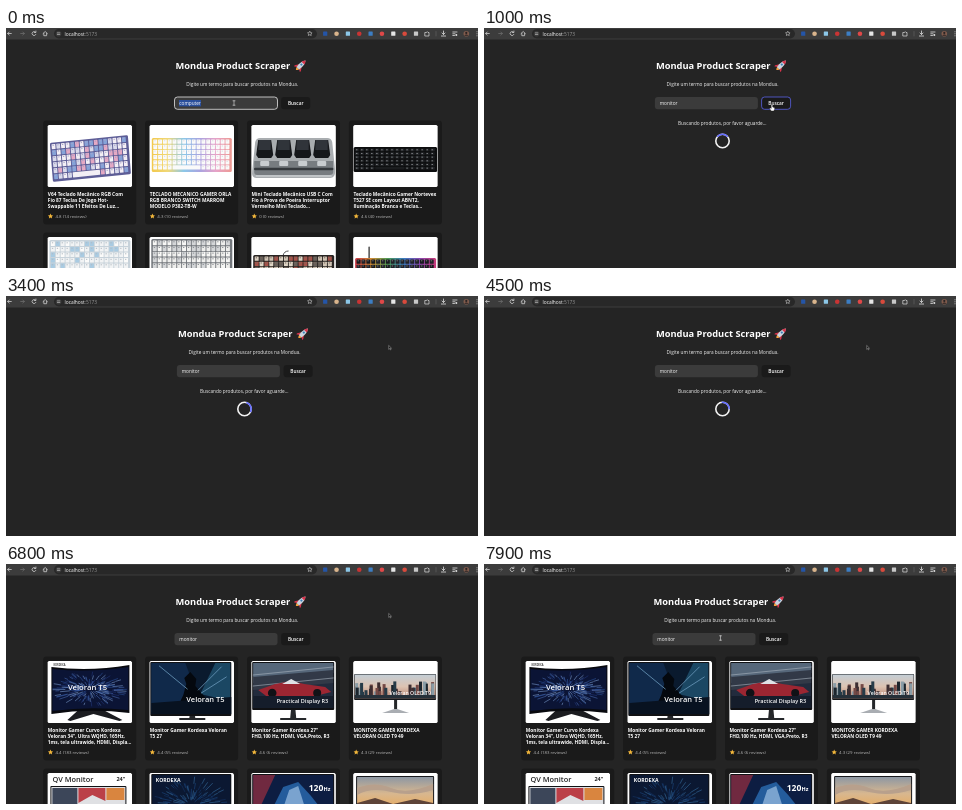
An HTML page that plays this animation: 472x240 px, repeating every 8000 ms.

```html
<!DOCTYPE html>
<html lang="pt-BR">
<head>
<meta charset="utf-8">
<title>Product Scraper</title>
<style>
  html, body { margin: 0; width: 100%; height: 100%; overflow: hidden; background: #242424; }
  svg { display: block; width: 472px; height: 240px; font-family: "Open Sans", "Noto Sans", sans-serif; }
</style>
</head>
<body>
<svg id="stage" viewBox="0 0 472 240" xmlns="http://www.w3.org/2000/svg"></svg>
<script>
const LOOP = 8000, STEP = 100, SEARCH_AT = 1000, RESULTS_AT = 6700;

const rect = (x, y, w, h, fill, r = 0, more = '') =>
  `<rect x="${x}" y="${y}" width="${w}" height="${h}" rx="${r}" fill="${fill}" ${more}/>`;
const circle = (x, y, r, fill) => `<circle cx="${x}" cy="${y}" r="${r}" fill="${fill}"/>`;
const path = (d, fill) => `<path d="${d}" fill="${fill}"/>`;
const line = (d, color = '#ccc', width = .8) =>
  `<path d="${d}" fill="none" stroke="${color}" stroke-width="${width}" stroke-linecap="round"/>`;
const text = (x, y, size, str, fill = '#fff', weight = 400, more = '') =>
  `<text x="${x}" y="${y}" font-size="${size}" fill="${fill}" font-weight="${weight}" ${more}>${str}</text>`;
const group = (transform, body, more = '') => `<g transform="${transform}" ${more}>${body}</g>`;
const gradient = (id, colors, down = 0) =>
  `<linearGradient id="${id}" x2="${1 - down}" y2="${down}">` +
  colors.map((c, i) => `<stop offset="${i / (colors.length - 1)}" stop-color="${c}"/>`).join('') + '</linearGradient>';

function randomFrom(seed) {
  return () => (seed = (seed * 16807) % 2147483647) / 2147483647;
}

function starPath(cx, cy, r) {
  return 'M' + Array.from({ length: 10 }, (_, i) => {
    const a = i * Math.PI / 5 - Math.PI / 2, d = i % 2 ? r * .48 : r;
    return `${(cx + d * Math.cos(a)).toFixed(2)} ${(cy + d * Math.sin(a)).toFixed(2)}`;
  }).join('L') + 'Z';
}

function toolbar() {
  const badges = ['#2455a8', '#d9b48c', '#8cc7e8', '#c93434', '#3c7ec4', '#e04848', '#e6e6e6', '#d84a3c', '#c8c8c8'];
  return rect(0, 0, 472, 11.5, '#3c3c3c') + rect(48, 1, 263, 9.5, '#282828', 4.7) +
    line('M5.3 5.5H1.7M3.2 4L1.7 5.5L3.2 7') +
    line('M14.7 5.5H18.3M16.8 4L18.3 5.5L16.8 7', '#6c6c6c') +
    line('M29.6 4.2A2 2 0 1 0 29.9 6.4M29.9 3V4.5H28.4') +
    line('M37 5.6L39.2 3.5L41.4 5.6M37.8 5.2V7.7H40.6V5.2') +
    circle(52.6, 5.7, 2.8, '#3c3c3c') + line('M51.4 4.9H53.8M51.4 6.5H53.8', '#ccc', .6) +
    text(58.6, 7.5, 4.8, 'localhost<tspan fill="#999">:5173</tspan>') +
    `<path d="${starPath(303.8, 5.6, 2.4)}" fill="none" stroke="#ccc" stroke-width=".6"/>` +
    badges.map((c, i) => {
      const x = 319.2 + i * 11.35;
      return i % 2 ? circle(x, 5.7, 2.3, c) : rect(x - 2.1, 3.6, 4.2, 4.2, c, .5);
    }).join('') +
    line('M419.2 4.5H420.5Q421.3 2.8 422 4.5H423V8H419.2Z', '#ddd', .7) + line('M430 3.5V8', '#666', .6) +
    line('M437.5 3V6.4M436 5L437.5 6.5L439 5M435.4 8H439.6', '#ddd') +
    line('M446.8 4H451M446.8 5.8H449M446.8 7.5H448.5', '#ddd') + circle(450.3, 7, 1, '#ddd') +
    circle(460.3, 5.7, 2.8, '#805b4c') + path('M458.2 7.8Q460.3 5 462.4 7.8Z', '#292323') + circle(460.3, 4.9, 1.1, '#292323') +
    [3.7, 5.7, 7.7].map(y => circle(471, y, .5, '#ddd')).join('');
}

const rocket = group('translate(294.6 37.4) rotate(45) scale(.88)',
  path('M-2 4Q0 10.5 2 4Z', '#f9a23b') + path('M-2.2 .5L-4.8 4.5V6L-1.5 4ZM2.2 .5L4.8 4.5V6L1.5 4Z', '#d8344c') +
  path('M0 -8Q3.6 -3.5 2 4.4H-2Q-3.6 -3.5 0 -8Z', '#ccd5df') + path('M0 -8Q1.9 -5.8 2.3 -3.7H-2.3Q-1.9 -5.8 0 -8Z', '#d8344c') +
  circle(0, -1.3, 1.25, '#3c81b8'));

const header =
  text(169.5, 41.2, 9.3, 'Mondua Product Scraper', '#fff', 700) + rocket +
  text(180.2, 57.5, 4.72, 'Digite um termo para buscar produtos na Mondua.', '#f4f4f4') +
  rect(168.5, 69, 103, 12.3, '#3b3b3b', 3, 'id="field" stroke-width=".8"') +
  rect(173, 72, 22, 6.4, '#2a4f9c', 0, 'id="selection"') +
  text(173.3, 76.9, 4.72, '', '#fff', 500, 'id="query"') +
  rect(275.2, 69, 29, 12.3, '#1a1a1a', 3, 'id="button" stroke-width=".7"') +
  text(281.9, 76.9, 4.75, 'Buscar', '#fff', 600);

const loading =
  text(194, 97.2, 4.72, 'Buscando produtos, por favor aguarde...', '#f4f4f4') +
  '<circle cx="238.5" cy="113" r="6.7" fill="none" stroke="#f3f3f3" stroke-width="1.6"/>' +
  `<g id="spinner">${line('M233.76 108.26A6.7 6.7 0 0 1 243.24 108.26', '#646cff', 1.6)}</g>`;

// Product art is drawn in a box of 84.7 by 62.
function keyboard(x, y, w, h, body, colors, legend = 'none') {
  const random = randomFrom(7), cols = 16, rows = 6;
  const dx = (w - 3) / cols, dy = (h - 3) / rows;
  let art = rect(x, y, w, h, body, 1.5);
  for (let r = 0; r < rows; r++) {
    for (let c = 0; c < cols; c++) {
      const space = r === rows - 1 && c > 3 && c < 10;
      if (space && c > 4) continue;
      const color = colors[Math.floor(random() * colors.length)];
      const left = x + 1.5 + c * dx, top = y + 1.5 + r * dy;
      art += rect(left.toFixed(2), top.toFixed(2),
        ((space ? 6 : 1) * dx - .9).toFixed(2), (dy - .9).toFixed(2), color, .5);
      if (!space) art += rect((left + 1).toFixed(2), (top + .8).toFixed(2), 1.3, 1, legend);
    }
  }
  return art;
}

function switchPad() {
  let art = path('M4 17Q5 13 9 13H76Q80 13 81 17L84 46Q84 53 79 53H5Q0 53 1 46Z', '#a9adb0') +
    path('M3 36H82V47Q82 50 78 50H6Q3 50 3 47Z', '#777c80') + line('M4 44H81', '#35393d', 2.4) + line('M5 51H80', '#d8dcde', 1);
  for (let i = 0; i < 4; i++) {
    const x = 5 + i * 19;
    art += path(`M${x} 30L${x + 2} 15H${x + 15}L${x + 17} 30L${x + 15} 33H${x + 2}Z`, '#15171a') +
      path(`M${x + 2.5} 15H${x + 14.5}L${x + 14.5} 25H${x + 2}Z`, '#30343a') + rect(x + 4, 36, 9, 5, '#c9cdd0', 1);
  }
  return art;
}

const stand = (cx, y) => path(`M${cx - 2} ${y}H${cx + 2}L${cx + 3} 57H${cx + 13}V59H${cx - 13}V57H${cx - 3}Z`, '#25272a');
const screen = (x, y, w, h, fill) => rect(x, y, w, h, '#101114', 1) + rect(x + 1, y + 1, w - 2, h - 3, fill);
const label = (x, y, size, str, fill = '#fff', weight = 600) => text(x, y, size, str, fill, weight);

function burst(cx, cy, rx, ry, colors) {
  const random = randomFrom(73);
  let art = '';
  for (let i = 0; i < 150; i++) {
    const a = i * 2.4, inner = .15 + random() * .7, outer = inner + .08 + random() * .25;
    const point = d => `${(cx + Math.cos(a) * d * rx).toFixed(1)} ${(cy + Math.sin(a) * d * ry).toFixed(1)}`;
    art += line(`M${point(inner)}L${point(Math.min(1, outer))}`, colors[i % colors.length], .5);
  }
  return art;
}

const curvedMonitor = () =>
  path('M31 49L42 47L56 49L75 59L72 60L46 53L23 60L20 59Z', '#1b1c20') +
  path('M4 6Q42 11 82 4V52Q42 47 4 53Z', '#08090e') + path('M5 8Q42 12 81 6V49Q42 45 5 50Z', '#0b1435') +
  burst(42, 28, 37, 17, ['#315ba9', '#8fb2e6', '#243b83', '#5379c4']) +
  label(6, 5, 2.6, 'KORDEXA', '#222') + label(20.5, 29, 7.7, 'Veloran T5');

const heroMonitor = () =>
  stand(43, 50) + screen(1, 1, 81, 54, '#0a1a2e') +
  path('M2 2L36 2L48 34L25 51H2Z', '#10294a') + path('M66 2L81 2V40L51 33Z', '#1b4763') +
  path('M26 51L34 34L37 23L35 17L41 11L47 18L46 25L60 41L52 40L56 51Z', '#04080e') +
  line('M10 5L38 28M72 6L49 29M77 16L52 32', '#6b9abb', .8) + path('M2 42L82 36V53H2Z', '#081220') +
  label(37, 40.5, 7.5, 'Veloran T5');

const racingMonitor = () =>
  stand(42, 46) + screen(1, 1, 82, 48, '#222b3d') +
  path('M2 2H82V12L2 22Z', '#56677a') + path('M2 16L82 9V22L2 29Z', '#323947') + line('M2 14L82 6M2 25L82 17', '#aab4bf', .6) +
  path('M7 29L24 23L40 20L53 23L74 26L80 31L64 35H15Z', '#9c2632') + path('M31 23L40 18L49 23Z', '#dfe2e6') +
  circle(21, 32, 4.3, '#101116') + circle(66, 32, 4, '#101116') +
  rect(2, 35, 80, 12, '#151d2b') + label(25.5, 41.5, 5.5, 'Practical Display R3');

function wideMonitor() {
  const random = randomFrom(19);
  let art = rect(41, 38, 3, 12, '#25272a') + path('M41 48H44L56 52H29Z', '#a9adb2') + rect(1, 13, 82, 26, '#15171a', 1) +
    rect(1.5, 13.5, 81, 24, 'url(#dusk)');
  for (let i = 0; i < 44; i++) {
    const x = 2 + random() * 77, h = 5 + random() * 11;
    art += rect(x.toFixed(1), (36 - h).toFixed(1), 3, h.toFixed(1), ['#3c2d31', '#744945', '#263b48', '#8a9da7', '#1c252d'][i % 5]);
  }
  return art + rect(1.5, 34, 81, 3.5, '#26313a') + label(36.5, 34, 5.2, 'Veloran OLED T9');
}

const keyboards = [
  { name: ['V64 Teclado Mecânico RGB Com', 'Fio 87 Teclas De Jogo Hot-', 'Swappable 11 Efeitos De Luz...'],
    rating: '4.8 (14 reviews)',
    art: group('matrix(1 -.1 .08 1 0 0)',
      keyboard(1, 18, 78, 39, '#5d5d96', ['#f3eff5', '#f3eff5', '#e5a9c4', '#86a3d8', '#d9daeb'], '#a9a4c8')) },
  { name: ['TECLADO MECANICO GAMER ORLA', 'RGB BRANCO SWITCH MARROM', 'MODELO P382-TB-W'], rating: '4.3 (10 reviews)',
    art: keyboard(2.5, 13, 80, 34, 'url(#rainbow)', ['#fafafa'], '#dedee2') },
  { name: ['Mini Teclado Mecânico USB C Com', 'Fio à Prova de Poeira Interruptor', 'Vermelho Mini Teclado...'],
    rating: '0 (0 reviews)', art: switchPad() },
  { name: ['Teclado Mecânico Gamer Nortevex', 'T527 SE com Layout ABNT2,', 'Iluminação Branca e Teclas...'],
    rating: '4.6 (40 reviews)', art: keyboard(.5, 22, 83.5, 25, '#0c0d0e', ['#1b1d1f', '#222427'], '#8c8f92') },
  { art: keyboard(2, 3, 81, 36, '#c7d2da', ['#fbfbfa', '#f1f3f4', '#f1f3f4', '#a9cbe2'], '#b2bac2') },
  { art: keyboard(2, 2, 81, 37, '#73777c', ['#f7f7f5', '#eeeeec', '#d4d6d8'], '#8c9095') },
  { art: line('M32 18Q33 14 37 14', '#555', 1) +
    keyboard(2, 18, 81, 34, '#292523', ['#ded4c5', '#d2c6b6', '#ded4c5', '#a7534a', '#68605a'], '#77695e') },
  { art: line('M16 22V10', '#222', 1.2) + keyboard(2, 21, 81, 34, 'url(#neon)', ['#18191d', '#222329'], '#777') }
];

const monitors = [
  { name: ['Monitor Gamer Curvo Kordexa', 'Veloran 34", Ultra WQHD, 165Hz,', '1ms, tela ultrawide, HDMI, Displa...'],
    rating: '4.4 (183 reviews)', art: curvedMonitor() },
  { name: ['Monitor Gamer Kordexa Veloran', 'T5 27'], rating: '4.4 (55 reviews)', art: heroMonitor() },
  { name: ['Monitor Gamer Kordexa 27"', 'FHD,100 Hz, HDMI, VGA,Preto, R3'], rating: '4.6 (6 reviews)', art: racingMonitor() },
  { name: ['MONITOR GAMER KORDEXA', 'VELORAN OLED T9 49'], rating: '4.3 (29 reviews)', art: wideMonitor() },
  { art: label(5, 9, 7.4, 'QV Monitor', '#252525') + label(69, 8, 5.5, '24"', '#252525', 700) + screen(3, 13, 76, 44, '#dfe0e3') +
    rect(5, 15, 25, 28, '#3c4659') + path('M31 15H58V28L45 22L31 30Z', '#bb4048') +
    rect(59, 15, 18, 12, '#d9853f') + rect(31, 31, 26, 12, '#7c9fc0') },
  { art: screen(2, 1, 80, 56, '#0b1832') + burst(42, 32, 38, 28, ['#1d4f8d', '#16386c', '#3f7fb5']) +
    label(6.5, 9, 5.2, 'KORDEXA', '#fff', 700) },
  { art: screen(1, 1, 82, 56, '#0d1d42') + path('M2 2H24L10 32H2Z', '#702940') + path('M23 32L32 14L47 9L59 22L67 32Z', '#245c9c') +
    path('M33 32L38 17L47 13L53 32Z', '#7aa3cf') + label(57.5, 17.5, 8.6, '120<tspan font-size="5.5">Hz</tspan>', '#fff', 700) },
  { art: rect(3, 3, 78, 55, '#17181b', 1) + rect(4, 4, 76, 50, 'url(#sunset)') +
    path('M4 15Q22 8 38 15T80 11V17Q58 24 38 19T4 22Z', '#b8a08c') + path('M4 30L22 25L40 31L62 26L80 30V54H4Z', '#5d4338') }
];

function card({ name = [], rating, art }, i) {
  const x = 37.2 + (i % 4) * 101.9, y = i < 4 ? 92.5 : 204.5;
  const words = name.map((row, n) => text(4.6, 75 + n * 6, 4.8, row, '#fff', 700)).join('');
  const score = rating ? path(starPath(7.3, 95.8, 2.7), '#f3b73b') + text(12.2, 97.3, 4.35, rating, '#bbb') : '';
  return group(`translate(${x} ${y})`, rect(0, 0, 93, 104, '#1a1a1a', 3) +
    group('translate(4.2 4.5)', rect(0, 0, 84.7, 62, '#fff', 1.5) + art, 'clip-path="url(#photo)"') + words + score);
}

const pointers = {
  beam: line('M-1 -2.2H1M0 -2.2V2.2M-1 2.2H1', '#ddd', .6),
  hand: `<path d="M-.8 -2.5Q0 -3.3 .7 -2.5V0L2.7 .7V2.3L1.8 4H-.8L-2.5 1.4L-1.8 .8L-.8 1.5Z" fill="#fff" stroke="#111" stroke-width=".4"/>`,
  arrow: `<path d="M-.3 -1.6V2.4L.7 1.5L1.3 2.9L2 2.6L1.4 1.2H2.5Z" fill="#111" stroke="#ccc" stroke-width=".4"/>`
};

const stage = document.getElementById('stage');
stage.innerHTML =
  `<defs><clipPath id="photo">${rect(0, 0, 84.7, 62, '#fff', 1.5)}</clipPath>` +
  gradient('rainbow', ['#f2c94d', '#f0d878', '#8cc7e8', '#a9a3e0', '#e6a3c8', '#ee9a92']) +
  gradient('neon', ['#c93a4a', '#cf8a33', '#4f9a55', '#3b7cc0', '#8a48b0', '#c93a78']) +
  gradient('dusk', ['#c3ced6', '#dcc3b2', '#b98470'], 1) +
  gradient('sunset', ['#8d97a3', '#d8b78f', '#eaa957', '#7a4a35'], 1) + '</defs>' +
  rect(0, 0, 472, 240, '#242424') + toolbar() + `<g id="header">${header}</g><g id="loading">${loading}</g>` +
  `<g id="keyboards">${keyboards.map(card).join('')}</g><g id="monitors">${monitors.map(card).join('')}</g>` +
  '<g id="pointer">' + Object.entries(pointers).map(([id, art]) => `<g id="${id}">${art}</g>`).join('') + '</g>';

const el = Object.fromEntries([...stage.querySelectorAll('[id]')].map(node => [node.id, node]));
const set = (id, name, value) => el[id].setAttribute(name, value);
const show = (id, on) => set(id, 'display', on ? 'inline' : 'none');

const POINTER = [[0, 228, 75], [400, 228, 75], [900, 288, 79], [1200, 288, 79], [1700, 383, 51],
                 [7200, 383, 51], [7700, 236.5, 74], [8000, 236.5, 74]];
const SPIN = [[1000, 0], [2300, 1.25], [4500, 3.12], [6500, 4.78], [8000, 6.03]];

function valueAt(keys, t, col = 1, ease = k => k) {
  const i = Math.max(1, keys.findIndex(key => key[0] > t));
  const a = keys[i - 1], b = keys[i];
  const k = Math.max(0, (t - a[0]) / (b[0] - a[0]));
  return a[col] + (b[col] - a[col]) * ease(k);
}
const smooth = k => k * k * (3 - 2 * k);

function draw(t) {
  const before = t < SEARCH_AT, busy = !before && t < RESULTS_AT;
  show('keyboards', before);
  show('loading', busy);
  show('monitors', t >= RESULTS_AT);

  const shift = busy ? 2.4 : 0;
  set('header', 'transform', `translate(${shift} 0)`);
  el.query.textContent = t < 100 ? 'computer' : 'monitor'.slice(0, Math.ceil(t / 80));
  show('selection', t < 100);
  set('field', 'stroke', before ? '#e4e4e4' : 'none');

  const x = valueAt(POINTER, t, 1, smooth), y = valueAt(POINTER, t, 2, smooth);
  const onRow = y > 69 && y < 81.3;
  const onButton = onRow && x > 275 + shift && x < 304 + shift;
  const onField = onRow && x < 271 + shift;
  set('pointer', 'transform', `translate(${x} ${y})`);
  show('beam', onField);
  show('hand', onButton);
  show('arrow', !onField && !onButton);
  set('button', 'stroke', onButton ? '#646cff' : 'none');
  set('spinner', 'transform', `rotate(${valueAt(SPIN, t) * 360} 238.5 113)`);
}

const start = performance.now();
function tick() {
  const elapsed = (performance.now() - start) % LOOP;
  draw(Math.floor(elapsed / STEP) * STEP);
  requestAnimationFrame(tick);
}
tick();
</script>
</body>
</html>
```
